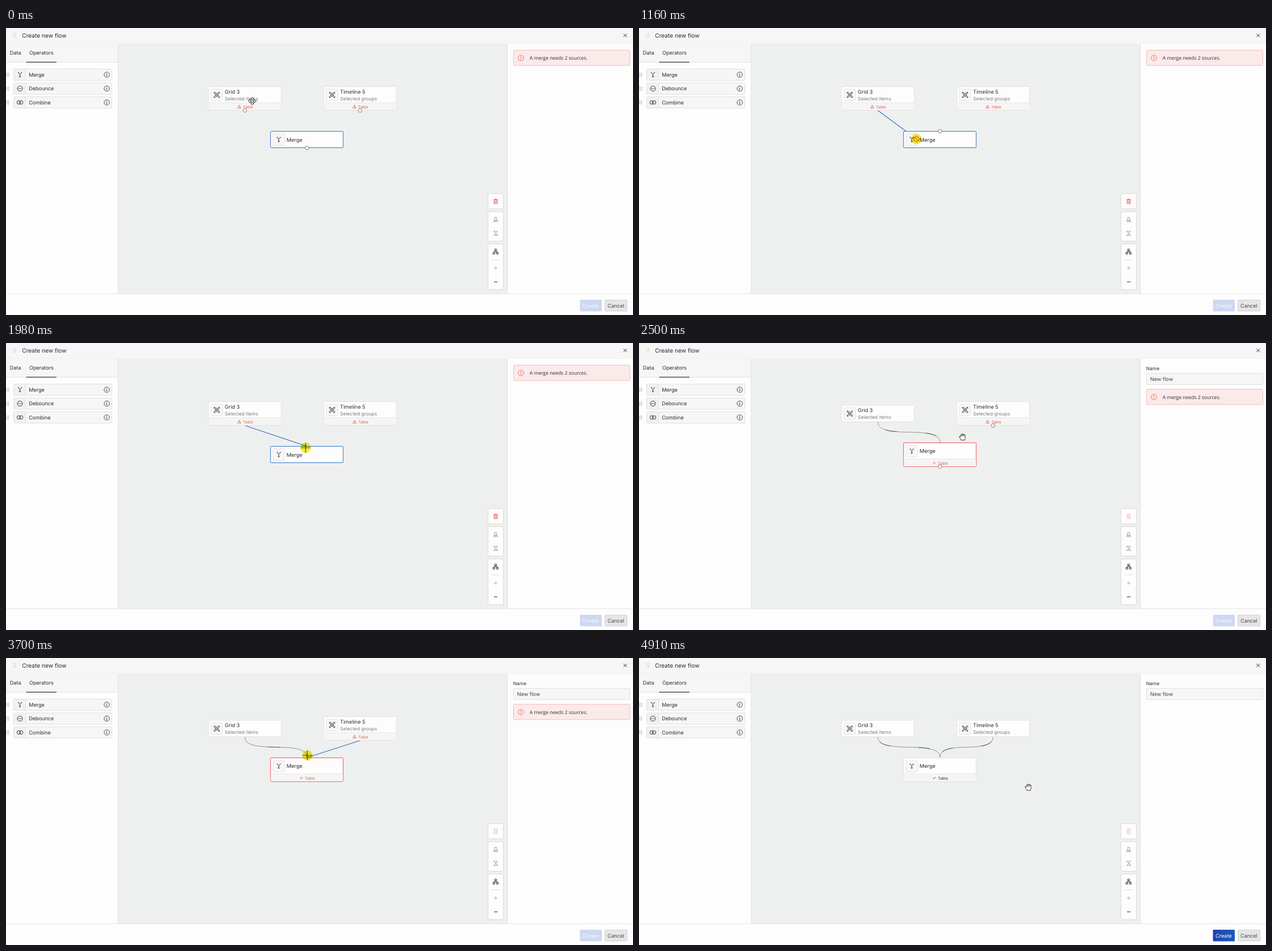
An HTML page for the animation above (4970 ms loop, 1105x507 px).

```html
<!DOCTYPE html>
<html lang="en">
<head>
<meta charset="utf-8">
<title>Create new flow</title>
<style>
html, body { margin: 0; width: 100%; height: 100%; overflow: hidden; background: #fdfdfd; }
svg { display: block; width: 1105px; height: 507px; }
text { font: 9.1px Inter, sans-serif; fill: #2b2b2b; text-rendering: geometricPrecision; white-space: pre; }
.title { font-size: 10.2px; }
.sub { font-size: 8.45px; fill: #7c7c7c; }
.tag { font-size: 6.9px; }
.label { font-size: 8.4px; }
.note { font: 8.55px "Open Sans", sans-serif; }
.line { fill: none; stroke-linecap: round; stroke-linejoin: round; }
.handle { fill: #fff; stroke: #7d7d7d; stroke-width: 1; }
.edge { fill: none; stroke: #8f8f8f; stroke-width: 1; }
.edge.hot { stroke: #6f6f75; stroke-width: 4; }
.pulse { fill: none; stroke: #555; stroke-width: 1; stroke-dasharray: 20 50; }
.cursor { fill: #fff; stroke: #222; stroke-width: .9; stroke-linejoin: round; }
</style>
</head>
<body>
<svg id="stage" viewBox="0 0 1105 507" xmlns="http://www.w3.org/2000/svg"></svg>
<script>
const LOOP = 4970;
const INK = '#2b2b2b', RED = '#e8604f', GREY = '#a3a3a3', NAVY = '#26354f';

// ---- markup helpers ----
const box = (x, y, w, h, fill, stroke = 'none', r = 0) =>
  `<rect x="${x}" y="${y}" width="${w}" height="${h}" rx="${r}" fill="${fill}" stroke="${stroke}"/>`;
const text = (x, y, s, cls = '', fill = '') =>
  `<text x="${x}" y="${y}" class="${cls}"${fill && ` style="fill:${fill}"`}>${s}</text>`;
const line = (d, color = INK, w = 1) =>
  `<path class="line" d="${d}" stroke="${color}" stroke-width="${w}"/>`;
const ring = (x, y, r, color = INK, w = 1) =>
  `<circle cx="${x}" cy="${y}" r="${r}" fill="none" stroke="${color}" stroke-width="${w}"/>`;
const dot = (x, y, r, color) => `<circle cx="${x}" cy="${y}" r="${r}" fill="${color}"/>`;
const at = (x, y, s) => `<g transform="translate(${x} ${y})">${s}</g>`;
const group = (id, s) => `<g id="${id}">${s}</g>`;
const handle = (x, y) => `<circle class="handle" cx="${x}" cy="${y}" r="3.2"/>`;

const grip = (x, y, dx, dy, color) => {
  let s = '';
  for (let i = 0; i < 6; i++) s += dot(x + (i % 2) * dx, y + (i >> 1) * dy, .75, color);
  return s;
};

// ---- icons, centred on 0,0 ----
const icon = {
  merge: line('M-2.6-3.6L0-.6L2.6-3.6M0-.6V4M-1.4 2.8L0 4.2L1.4 2.8', INK, .9) +
    dot(-2.8, -3.8, .8, INK) + dot(2.8, -3.8, .8, INK),
  debounce: ring(0, 0, 4.5, NAVY) + dot(-2.1, 0, .75, NAVY) + dot(0, 0, .75, NAVY) + dot(2.1, 0, .75, NAVY),
  combine: ring(-2.1, 0, 3.1, INK) + ring(2.1, 0, 3.1, INK),
  info: ring(0, 0, 4.7, NAVY, .9) + line('M0-.5V2.4', NAVY, 1) + dot(0, -2.2, .65, NAVY),
  target: line('M-4.6-2.6V-4.6H-2.6M2.6-4.6H4.6V-2.6M4.6 2.6V4.6H2.6M-2.6 4.6H-4.6V2.6', INK, .9) +
    line('M0-3L2.7-1.5V1.5L0 3L-2.7 1.5V-1.5Z', INK, .9) + ring(0, 0, 1.2, INK, .8) +
    line('M-4.2-4.2L-2.6-2.6M4.2-4.2L2.6-2.6M-4.2 4.2L-2.6 2.6M4.2 4.2L2.6 2.6', INK, .7),
  alert: ring(0, 0, 4.8, RED, .9) + line('M0-2.3V.5', RED, 1) + dot(0, 2.3, .65, RED),
  trash: line('M-3.6-2.9H3.6M-1.3-2.9V-4.2H1.3V-2.9M-2.8-2.7V4.2H2.8V-2.7M-1-1V2.5M1-1V2.5', '#ef5b50', 1),
  stack: line('M-1.6-3.8H1.6V-1L2.8 1.6H-2.8L-1.6-1ZM-4.2 3.8H4.2M-3.4 1.8H3.4', GREY, 1),
  unstack: line('M-3.4-3.8H3.4L-2.6 3.6H3.4L.6.6M-4-3.8L4 4M-4 3.8H-2', GREY, 1),
  tree: line('M-1.4-4.4H1.4V-1.7H-1.4ZM-4.4 1.7H-1.7V4.4H-4.4ZM1.7 1.7H4.4V4.4H1.7ZM0-1.7V0M-3 1.7V0H3V1.7', INK, .95),
  warn: line('M0-2.6L2.9 2.4H-2.9Z', RED, .8) + line('M0-.8V.6', RED, .7) + dot(0, 1.5, .35, RED),
  cross: line('M-1.7-1.7L1.7 1.7M1.7-1.7L-1.7 1.7', RED, .8),
  check: line('M-2.2.1L-.7 1.5L2.3-1.5', INK, .8)
};

// ---- panels ----
const operator = (y, name, pic) =>
  grip(1.6, y - 2.6, 3, 2.6, '#8d8d8d') +
  box(13.5, y - 10, 173, 20, '#f6f6f6', '#e0e0e0', 1) +
  box(14, y - 9.5, 20, 19, '#f1f1f1') + line(`M34.5 ${y - 9.5}V${y + 9.5}`, '#e2e2e2') +
  at(24.5, y, pic) + text(40.2, y + 3.4, name) + at(177.6, y, icon.info);

const sidebar =
  box(0, 28, 197, 441, '#fdfdfd') + box(0, 28, 197, 32, '#f6f6f6') +
  line('M0 60.5H197', '#e3e3e3') + line('M36 60.3H88.5', '#333', 1.2) +
  text(6.8, 47.3, 'Data') + text(41, 47.3, 'Operators') +
  operator(82.5, 'Merge', icon.merge) + operator(107, 'Debounce', icon.debounce) +
  operator(131.5, 'Combine', icon.combine);

const chrome =
  box(0, 0, 1105, 28, '#f6f6f6') + line('M0 28H1105', '#e9e9e9', .8) +
  grip(13.6, 10, 3.4, 3, '#c9b090') + text(28.2, 16.8, 'Create new flow', 'title') +
  line('M1088.6 10.4L1094 15.8M1094 10.4L1088.6 15.8', INK, 1) +
  sidebar + line('M197.5 28V469', '#e3e3e3') +
  box(884, 28, 221, 441, '#fdfdfd') + line('M883.5 28V469', '#dfdfdf') +
  box(0, 469, 1105, 38, '#fdfdfd') + line('M0 469.5H1105', '#e5e5e5');

const panel = (y, h) => box(849.5, y, 27, h, '#fdfdfd', '#d9dada', 1);
const tools =
  panel(292.5, 27) + group('trash', at(863, 306.2, icon.trash)) +
  panel(324.5, 52) + at(863, 338.3, icon.stack) + at(863, 362.8, icon.unstack) +
  panel(381.5, 80.5) + at(863, 395, icon.tree) + line('M856 409.5H870', '#dedede') +
  line('M860.3 424H865.7M863 421.3V426.7', '#cbab76', 1) + line('M860.3 448.5H865.7', INK, 1);

const notice = y => box(894.5, y, 205, 27, '#fbeaea', '#f1bcbc', 1.5) +
  at(907.5, y + 13.7, icon.alert) + text(922.8, y + 16.8, 'A merge needs 2 sources.', 'note');

const form = text(893.8, 47.6, 'Name', 'label') +
  box(894.5, 53.5, 205, 20, '#f6f6f6', '#e0e0e0', 1.5) + text(900.8, 66.7, 'New flow', '', '#444');

const buttons =
  `<defs><linearGradient id="blue"><stop stop-color="#243fb3"/><stop offset="1" stop-color="#1b5cb9"/></linearGradient></defs>` +
  group('createOff', box(1011.5, 480, 38.5, 20.5, '#cdd8f1', 'none', 1.5) + text(1016, 493.6, 'Create', '', '#f6f8fd')) +
  group('createOn', box(1011.5, 480, 38.5, 20.5, 'url(#blue)', 'none', 1.5) + text(1016, 493.6, 'Create', '', '#fff')) +
  box(1055.5, 480.5, 39, 19.5, '#e6e6e8', '#d2d2d4', 1.5) + text(1060, 493.6, 'Cancel', '', '#4a4a4a');

// ---- flow nodes ----
function node(x, y, o) {
  const h = o.tag ? 42 : 29;
  let s = box(x, y, 128, h, '#fdfdfd', o.stroke || '#e0e2e1', 1.5);
  if (o.tag) {
    s += box(x + .5, y + 28.5, 127, 13, '#f5f5f5') + line(`M${x + .5} ${y + 28.5}H${x + 127.5}`, '#e6e6e6') +
      at(x + 54.2, y + 35.6, o.mark) + text(x + 60.6, y + 38.2, 'Table', 'tag', o.tag);
  }
  s += box(x + 4.5, y + 4.5, 20, 20.5, '#f7f7f7', '#e3e3e3', 2) + at(x + 14.5, y + 14.7, o.icon);
  return s + (o.sub
    ? text(x + 28.6, y + 12.1, o.name) + text(x + 28.6, y + 24.4, o.sub, 'sub')
    : text(x + 28.4, y + 18, o.name));
}
const warned = { tag: RED, mark: icon.warn };
const grid = { name: 'Grid 3', sub: 'Selected items', icon: icon.target };
const timeline = { name: 'Timeline 5', sub: 'Selected groups', icon: icon.target };
const merge = { name: 'Merge', icon: icon.merge };

const leftPath = 'M421 139C421 153 437 157 475.5 157.5S530.5 162 530.5 176';
const rightPath = 'M624 139C624 153 608 157 577 157.5S530.5 162 530.5 176';
const edge = (id, d) => group(id, `<path class="edge" d="${d}"/><path class="pulse" d="${d}"/>`);

const flow =
  box(198, 28, 685, 441, '#eef0ef') +
  edge('leftEdge', leftPath) + edge('rightEdge', rightPath) +
  '<line id="wire" stroke="#3170bf" stroke-width="1.1"/>' +
  group('gridOpen', node(357, 103.5, { ...grid, ...warned })) +
  group('gridDone', node(357, 110, grid)) +
  group('timeOpen', node(560.2, 103.5, { ...timeline, ...warned })) +
  group('timeDone', node(560.2, 110, timeline)) +
  group('mergeNew', node(466.2, 182.5, { ...merge, stroke: '#2f74c4' })) +
  group('mergeBad', node(466.2, 176.3, { ...merge, tag: RED, mark: icon.cross, stroke: '#f04b5a' })) +
  group('mergeOk', node(466.2, 176.3, { ...merge, tag: '#333', mark: icon.check })) +
  group('outA', handle(421, 145.7) + handle(624, 145.7) + handle(530.3, 211.8)) +
  group('outB', handle(624, 145.7) + handle(530.3, 218.3)) +
  group('inA', handle(530.3, 182.4)) + group('inB', handle(530.3, 176));

// ---- pointer shapes, hotspot on 0,0 ----
const shape = (id, d) => `<path id="${id}" class="cursor" d="${d}"/>`;
const pointer = group('pointer',
  '<circle id="glow" r="9.3" fill="#fbec3e" style="mix-blend-mode:multiply"/>' +
  shape('move', 'M0-7L3-4H1V-1H4V-3L7 0L4 3V1H1V4H3L0 7L-3 4H-1V1H-4V3L-7 0L-4-3V-1H-1V-4H-3Z') +
  shape('hand', 'M-1.2 1Q0-.6 1.2 1V6Q2.4 5.2 3.4 6.4Q4.6 5.8 5.4 7Q7.2 6.6 7.2 8.4V11Q7.2 13 6.2 14V15.6H-.6V14.2Q-2 13-3.8 10Q-4.4 8.5-3 8.3L-1.2 9.8ZM1.2 6V8.6M3.4 6.4V8.8M5.4 7V9') +
  shape('grab', 'M-2.6 5.8V4.4Q-4.4 2.6-5.6.2Q-5.8-1.2-4.4-.9L-3.2.4V-3.4Q-2.4-5-1.3-3.6Q-.8-6.4.7-4.6Q2-6 2.7-3.8Q4.4-4.8 4.9-2.6V1.8Q4.8 3.4 4 4.4V5.8ZM-1.3-3.6V-.8M.7-4.6V-.8M2.7-3.8V-.8') +
  group('no', ring(0, 0, 4.6, '#d9681c', 1.4) + line('M-3.2-3.2L3.2 3.2', '#d9681c', 1.4)) +
  group('plus', line('M-8 0H8M0-8V8', '#45450f', 1.2)));

document.getElementById('stage').innerHTML = flow + tools + chrome +
  group('noticeA', notice(39.2)) + group('noticeB', notice(81.8)) + group('form', form) + buttons + pointer;

// ---- motion ----
const $ = id => document.getElementById(id);
const show = (id, on) => { $(id).style.display = on ? '' : 'none'; };

// time, x, y, pointer shape from that time on
const track = [
  [0, 434, 129, 'move'], [60, 434, 129, 'move'], [140, 421, 143, 'hand'], [180, 417, 147, 'hand'],
  [330, 416, 147, 'hand'], [640, 416, 148, 'hand'], [700, 419, 151, 'no'], [900, 449, 174, 'no'],
  [1160, 489, 196, 'no'], [1270, 489, 196, 'no'], [1500, 509, 195, 'no'], [1720, 524, 190, 'plus'],
  [1780, 526, 188.5, 'plus'], [1980, 528, 185, 'plus'], [2190, 528, 185, 'move'], [2330, 542, 176, 'grab'],
  [2660, 596, 156, 'grab'], [2840, 621, 148, 'hand'], [2960, 623, 148, 'hand'], [3080, 623, 148, 'hand'],
  [3140, 621, 148, 'no'], [3190, 619, 148, 'no'], [3240, 619, 148, 'no'], [3480, 573, 160, 'no'],
  [3610, 540, 170, 'plus'], [3700, 531, 172, 'plus'], [3830, 531, 172, 'hand'], [4100, 529.5, 173, 'hand'],
  [4400, 529.5, 173, 'hand'], [4470, 538, 176, 'move'], [4640, 596, 197, 'grab'], [4900, 686, 228, 'grab'],
  [LOOP, 686, 228, 'grab']
];
const shapes = ['move', 'hand', 'grab', 'no', 'plus'];

function pose(t) {
  let i = 0;
  while (i < track.length - 2 && track[i + 1][0] <= t) i++;
  const [t0, x0, y0, kind] = track[i], [t1, x1, y1] = track[i + 1];
  const k = (t - t0) / (t1 - t0);
  return { x: x0 + (x1 - x0) * k, y: y0 + (y1 - y0) * k, kind };
}

function render(t) {
  const joined = t >= 2190, done = t >= 3830;
  const drag1 = t >= 640 && !joined, drag2 = t >= 3080 && !done;
  const { x, y, kind } = pose(t);
  const snapped = kind === 'plus', dragging = drag1 || drag2;

  show('gridOpen', !joined); show('gridDone', joined);
  show('timeOpen', !done); show('timeDone', done);
  show('mergeNew', !joined); show('mergeBad', joined && !done); show('mergeOk', done);
  show('noticeA', !joined); show('noticeB', joined && !done); show('form', joined);
  show('createOff', !done); show('createOn', done);
  show('outA', t < 640); show('outB', joined && t < 3080);
  show('inA', drag1 && !snapped); show('inB', drag2 && !snapped);
  show('leftEdge', joined); show('rightEdge', done);
  $('trash').style.opacity = joined ? .35 : 1;

  const hot = done && t < 4450;
  $('leftEdge').firstChild.classList.toggle('hot', hot);
  $('leftEdge').lastChild.style.display = hot ? 'none' : '';
  for (const p of document.querySelectorAll('.pulse'))
    p.style.strokeDashoffset = -50 - ((t - 3700) / 500) * 70;

  show('wire', dragging);
  if (dragging) {
    const ends = { x1: drag1 ? 421 : 624, y1: 145.7, x2: snapped ? 530.3 : x, y2: snapped ? (drag1 ? 182.4 : 176) : y };
    for (const k in ends) $('wire').setAttribute(k, ends[k]);
  }

  $('pointer').setAttribute('transform', `translate(${x} ${y})`);
  show('glow', dragging);
  for (const s of shapes) show(s, s === kind);
}

const start = performance.now();
function tick() {
  render((performance.now() - start) % LOOP);
  requestAnimationFrame(tick);
}
tick();
</script>
</body>
</html>
```
